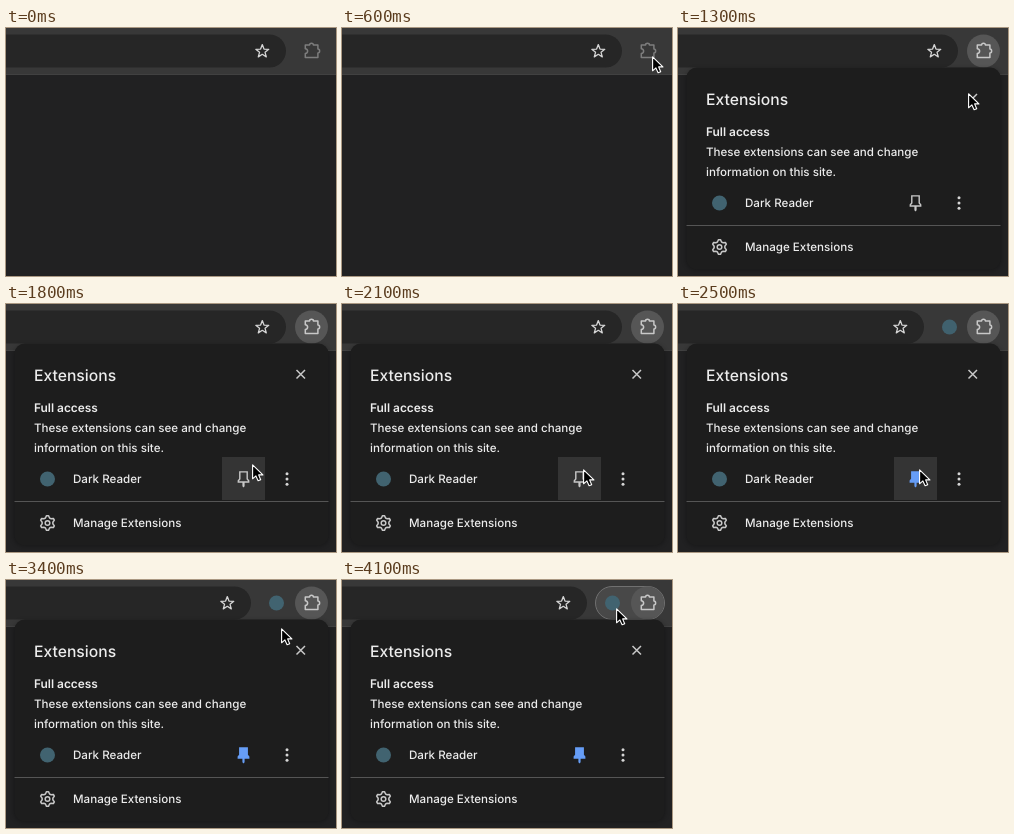
Recreate the animation shown at these times as an HTML page. Size 330 px wide and 248 px high, loop 4.5 s.

```html
<!DOCTYPE html>
<html lang="en">
<head>
<meta charset="utf-8">
<title>Pin an extension</title>
<style>
  html, body { margin: 0; width: 100%; height: 100%; overflow: hidden; background: #212122; }
  svg { display: block; width: 100vw; height: 100vh; }
  text { font: 450 11.6px Inter, "Open Sans", sans-serif; fill: #ececec; text-rendering: geometricPrecision; }
  .title { font-size: 15.7px; font-weight: 500; }
  .bold { font-size: 11.9px; font-weight: 600; }
  .line { fill: none; stroke: #c8c8c8; stroke-width: 1.5; stroke-linejoin: round; }
  .logo { fill: #416370; }
</style>
</head>
<body>
<svg viewBox="0 0 330 248">
  <defs>
    <filter id="soft" x="-10%" y="-10%" width="120%" height="120%"><feGaussianBlur stdDeviation="2.5"/></filter>
    <path id="pinShape" d="M-3.7 -6.8H3.7V.2L5.2 2V3.3H.4V7.2L0 7.7L-.4 7.2V3.3H-5.2V2L-3.7 .2Z"/>
  </defs>

  <rect width="330" height="248" fill="#212122"/>
  <rect width="330" height="46" fill="#383838"/>
  <rect y="46" width="330" height="1" fill="#414141"/>

  <g id="bar">
    <rect x="-80" y="6.5" width="360" height="33" rx="16.5" fill="#262626"/>
    <path id="star" class="line" style="stroke:#d6d6d6;stroke-width:1.3"/>
  </g>

  <rect id="pill" x="253.5" y="6.5" width="69" height="33" rx="16.5" fill="#484848" stroke="#707070"/>
  <circle id="pinned" class="logo" cy="23" r="7.5"/>
  <circle id="menuButton" cx="305.5" cy="23" r="16.5" fill="#565656"/>
  <path id="puzzle" class="line" d="M299.3 17H303.6C303.6 14.5 307.4 14.5 307.4 17H311.9V21C314.2 21 314.2 24.9 311.9 24.9V29.4H299.3V25.6C302.4 25.2 302.4 21 299.3 20.7Z"/>

  <g id="popup">
    <rect x="8" y="41" width="315" height="201" rx="10" fill="#000" opacity=".3" filter="url(#soft)"/>
    <rect x="8.5" y="39.5" width="314" height="202" rx="10" fill="#1d1d1d"/>
    <text class="title" x="28" y="77">Extensions</text>
    <path class="line" d="M290.5 66L299 74.5M299 66L290.5 74.5"/>
    <text class="bold" x="28" y="108.3">Full access</text>
    <text x="28" y="128.2">These extensions can see and change</text>
    <text x="28" y="147.7">information on this site.</text>
    <circle class="logo" cx="41.5" cy="175" r="7.5"/>
    <text x="67" y="179">Dark Reader</text>
    <rect id="pinHover" x="216" y="153" width="43" height="43" fill="#343434"/>
    <use id="pin" href="#pinShape" x="237.5" y="174.7" stroke-width="1.4"/>
    <g fill="#d6d6d6">
      <circle cx="281" cy="169.7" r="1.5"/><circle cx="281" cy="175" r="1.5"/><circle cx="281" cy="180.3" r="1.5"/>
    </g>
    <rect x="8.5" y="197" width="314" height="1" fill="#555"/>
    <path id="gear" class="line"/>
    <circle class="line" cx="41.5" cy="219" r="2.3"/>
    <text x="67" y="223">Manage Extensions</text>
  </g>

  <path id="cursor" d="M.6 .8V14.8L3.9 11.9L6.1 16.8L8.7 15.7L6.6 10.9H10.9Z" fill="#000" stroke="#fff" stroke-width="1.1" stroke-linejoin="round"/>
</svg>

<script>
const LOOP = 4500, STEP = 100;
const $ = id => document.getElementById(id);

// [time, x, y] of the pointer tip
const pointer = [
  [300, 324, 45], [600, 310, 28], [800, 306, 26], [1200, 306, 26],
  [1300, 290, 65], [1500, 268, 122], [1800, 246, 160], [1900, 250, 147],
  [2100, 241, 165], [2600, 241, 165], [2800, 253, 147], [3000, 265, 108],
  [3400, 275, 48], [3700, 275, 34], [4000, 275, 28], [4100, 274, 28]
];
// [time, distance the address bar has moved left]
const barShift = [[2200, 0], [2300, 14], [2400, 28], [2500, 34], [2600, 35]];
const popupFade = [[800, 0], [900, 0.6], [1000, 1]];

function sample(keys, t) {
  if (t <= keys[0][0]) return keys[0].slice(1);
  const i = keys.findIndex(key => key[0] >= t);
  if (i < 0) return keys[keys.length - 1].slice(1);
  const a = keys[i - 1], b = keys[i], k = (t - a[0]) / (b[0] - a[0]);
  return a.slice(1).map((v, n) => v + (b[n + 1] - v) * k);
}

function ring(cx, cy, count, radius, turn) {
  const points = Array.from({ length: count }, (_, i) => {
    const angle = turn + i * 2 * Math.PI / count, r = radius(i);
    return (cx + r * Math.cos(angle)).toFixed(2) + " " + (cy + r * Math.sin(angle)).toFixed(2);
  });
  return "M" + points.join("L") + "Z";
}

$("star").setAttribute("d", ring(256.3, 23.4, 10, i => i % 2 ? 2.9 : 6.8, -Math.PI / 2));
$("gear").setAttribute("d", ring(41.5, 219, 24, i => i % 4 < 2 ? 7.4 : 5.4, -Math.PI / 2 - Math.PI / 24));

const show = (id, on) => $(id).setAttribute("visibility", on ? "visible" : "hidden");
const set = (id, attrs) => Object.entries(attrs).forEach(([k, v]) => $(id).setAttribute(k, v));

function draw(t) {
  const [x, y] = sample(pointer, t);
  const [shift] = sample(barShift, t);
  const [fade] = sample(popupFade, t);
  const pinned = shift > 0;

  show("cursor", t >= 300);
  set("cursor", { transform: `translate(${x} ${y})` });
  set("bar", { transform: `translate(${-shift} 0)` });
  set("pinned", { cx: 305.5 - shift, opacity: shift / 35 });
  show("pill", pinned && y < 40);

  set("popup", { opacity: fade });
  show("menuButton", t >= 800);
  $("puzzle").style.stroke = t >= 800 ? "#c8c8c8" : "#7d7d7d";
  show("pinHover", x > 216 && x < 259 && y > 153 && y < 196);
  set("pin", { fill: pinned ? "#669df6" : "none", stroke: pinned ? "#669df6" : "#c8c8c8" });
}

function tick() {
  draw(Math.floor(performance.now() % LOOP / STEP) * STEP);
  requestAnimationFrame(tick);
}
tick();
</script>
</body>
</html>
```
